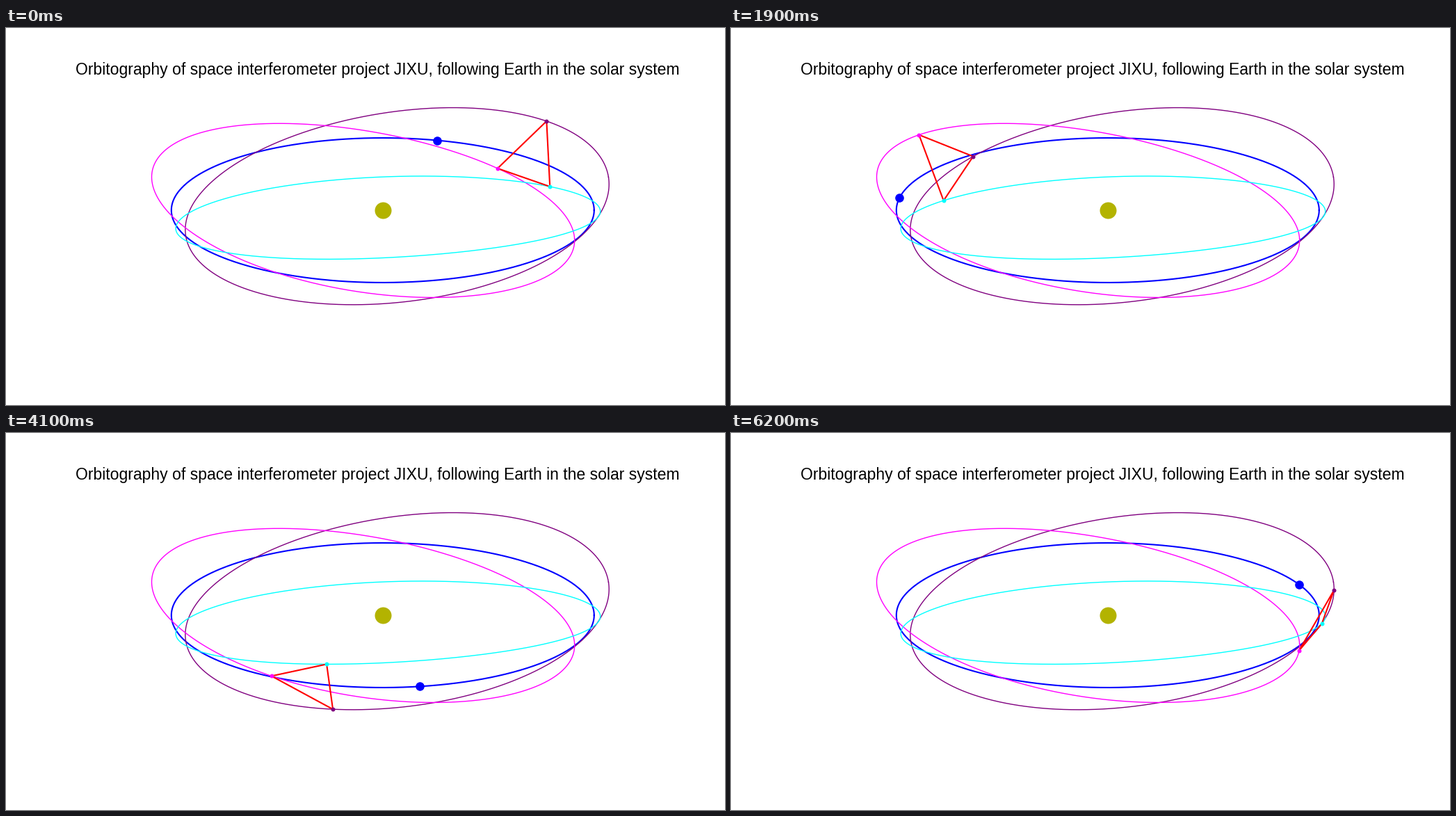
A matplotlib script that plays this animation: 1034 by 542 pixels, repeating every 6300 ms.

```python
import numpy as np
import matplotlib.pyplot as plt
from matplotlib.animation import FuncAnimation

WIDTH, HEIGHT, DPI = 1034, 542, 64
PT = 72 / DPI                      # points per pixel
FRAMES, INTERVAL = 63, 100
SUN = (541.8, 262.0)
RADIUS = 304.0
TILT = np.radians(20)              # camera elevation
ECC = 0.096
EARTH_START, CRAFT_START, STEP = 75, 45, 5   # degrees

# colour, orbit orientation in degrees, phase lead (constant, sine part) in degrees
CRAFT = [
    ("purple", -135, (0, 0)),
    ("magenta", -15, (0.45, 0.6)),
    ("cyan", 105, (0, 0)),
]


def project(x, y, z):
    up = y * np.sin(TILT) + z * np.cos(TILT)
    return SUN[0] + RADIUS * x, SUN[1] - RADIUS * up


def earth_at(angle):
    return project(np.cos(angle), np.sin(angle), 0)


def craft_at(angle, beta):
    """Inclined eccentric orbit, to first order in the eccentricity."""
    x = np.cos(angle) + ECC / 2 * (np.cos(2 * angle - beta) - 3 * np.cos(beta))
    y = np.sin(angle) + ECC / 2 * (np.sin(2 * angle - beta) - 3 * np.sin(beta))
    z = -np.sqrt(3) * ECC * np.cos(angle - beta)
    return project(x, y, z)


fig = plt.figure(figsize=(WIDTH / DPI, HEIGHT / DPI), dpi=DPI, facecolor="white")
ax = fig.add_axes([0, 0, 1, 1])
ax.set_xlim(0, WIDTH)
ax.set_ylim(HEIGHT, 0)
ax.axis("off")


def line(color, width, points=((), ()), z=2):
    return ax.plot(*points, color=color, lw=width * PT, zorder=z,
                   solid_joinstyle="round")[0]


def dot(color, size, z, point=((), ())):
    return ax.plot(*point, "o", color=color, ms=size * PT, mew=0, zorder=z)[0]


ax.text(100, 66.5, "Orbitography of space interferometer project JIXU, "
        "following Earth in the solar system",
        family="Liberation Sans", size=23.03 * PT, color="black",
        ha="left", va="baseline")

turn = np.linspace(0, 2 * np.pi, 721)
line("blue", 2.1, earth_at(turn))
for color, beta, _ in CRAFT:
    line(color, 1.4, craft_at(turn, np.radians(beta)))
dot("#b3b300", 24, 3, ([SUN[0]], [SUN[1]]))

earth = dot("blue", 12.6, 4)
triangle = line("red", 2.1, z=5)
craft_dots = [dot(color, 6, 6) for color, _, _ in CRAFT]


def update(frame):
    x, y = earth_at(np.radians(EARTH_START + STEP * frame))
    earth.set_data([x], [y])
    angle = np.radians(CRAFT_START + STEP * frame)
    corners = []
    for marker, (_, beta, (lead, swing)) in zip(craft_dots, CRAFT):
        phase = angle + np.radians(lead + swing * np.sin(angle))
        x, y = craft_at(phase, np.radians(beta))
        marker.set_data([x], [y])
        corners.append((x, y))
    triangle.set_data(*zip(*corners, corners[0]))
    return [earth, triangle, *craft_dots]


anim = FuncAnimation(fig, update, frames=FRAMES, interval=INTERVAL,
                     repeat=True, repeat_delay=0, blit=False)
plt.show()
```
